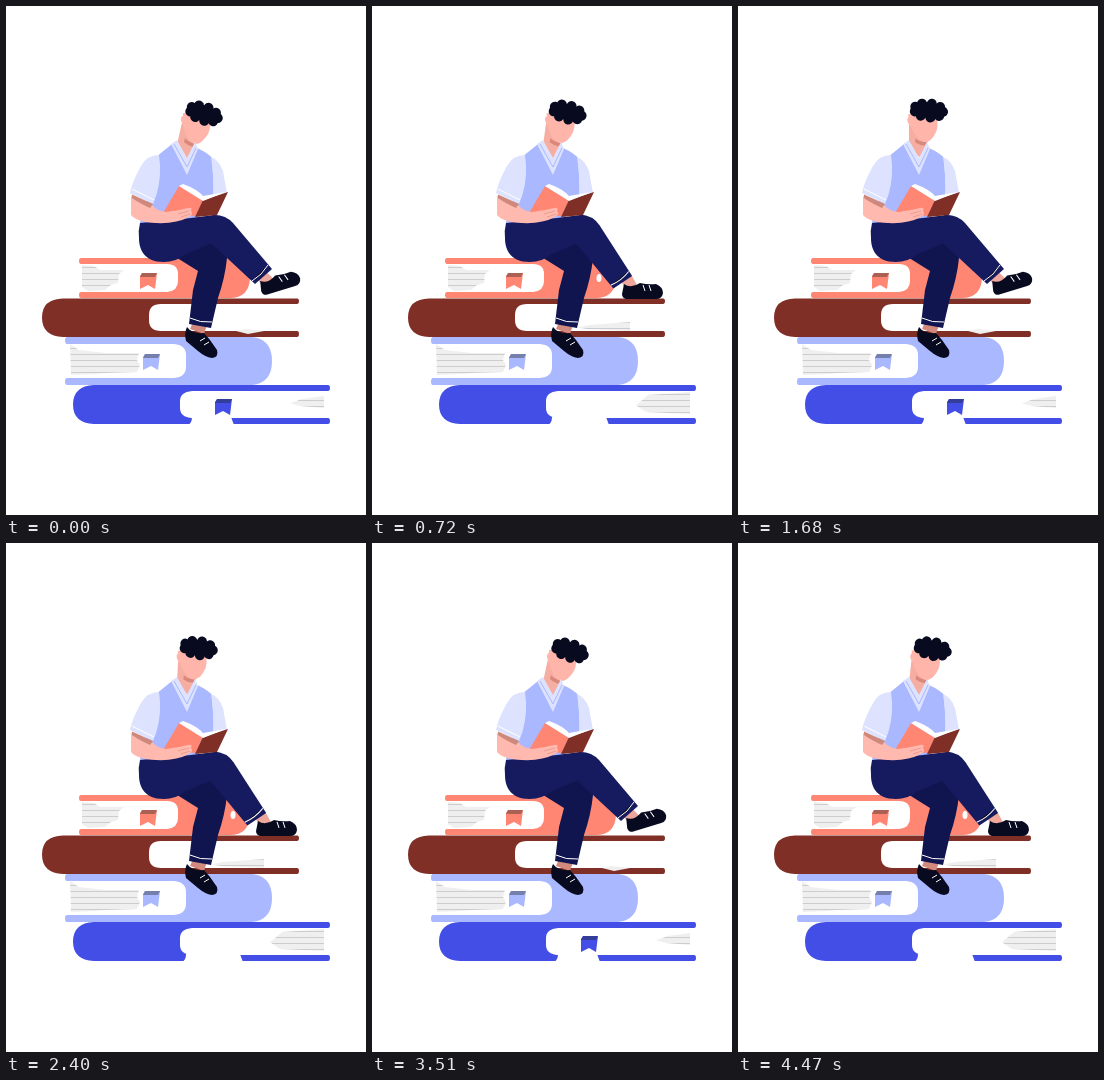
Recreate the animation shown at these times as an HTML page. Size 360x509 px, loop 4.5 s.

```html
<!DOCTYPE html>
<html lang="en">
<head>
<meta charset="utf-8">
<title>Reading on a stack of books</title>
<style>
  html, body { margin: 0; width: 100%; height: 100%; overflow: hidden; background: #fff; }
  svg { display: block; width: 100vw; height: 100vh; }
</style>
</head>
<body>
<svg viewBox="0 0 360 509">
  <defs>
    <pattern id="paper" width="10" height="6" y="3" patternUnits="userSpaceOnUse">
      <path fill="#efefef" d="M0 0h10v6H0z"/>
      <path fill="#cdcdcd" d="M0 0h10v1H0z"/>
    </pattern>
    <pattern id="paperMid" href="#paper" y="0"/>
    <pattern id="paperLow" href="#paper" y="4"/>
    <g id="ribbon">
      <path fill="currentColor" d="M0 3L2 0H17L15 16L8 12L0 16Z"/>
      <path fill="#222" opacity=".38" d="M0 4L2 0H17L15 4Z"/>
    </g>
  </defs>

  <!-- books -->
  <path fill="#ff8673" d="M75 252H224Q244 253 244 272Q243 292 224 292H75Q73 292 73 289T75 286H161Q172 285 172 275V268Q172 258 161 258H75Q73 258 73 255T75 252Z"/>
  <path fill="url(#paper)" d="M76 259L88 260L94 264L118 264L113 268L112 277L105 279L99 284L82 285L76 281Z"/>
  <use href="#ribbon" x="134" y="267" color="#ff8673"/>
  <ellipse id="hole" cx="227" cy="272" fill="#fff"/>
  <path fill="#802f27" d="M291 292.5H57Q36 293 36 311.500T57 331H291Q293 331 293 328T291 325H155Q143 325 143 314V309Q143 298 155 298H291Q293 298 293 295T291 292.500Z"/>
  <path id="brownPages" fill="url(#paperLow)"/>
  <path fill="#a9b8ff" d="M61 331H246Q266 333 266 355T246 379H61Q59 379 59 375.500T61 372H168Q180 371 180 361V349Q180 339 168 338H61Q59 338 59 334.500T61 331Z"/>
  <path fill="url(#paperMid)" d="M64 338L73 344L100 347H133L131 354L134 359L131 366L100 367L90 368L65 369Z"/>
  <use href="#ribbon" x="137" y="348" color="#a9b8ff"/>
  <path fill="#424ee6" d="M322 379H88Q67 380 67 398.500T88 418H322Q324 418 324 415T322 412H186Q174 411 174 402V395Q174 386 186 385H322Q324 385 324 382T322 379Z"/>
  <path id="bluePages" fill="url(#paperLow)"/>
  <path id="gap" fill="#fff"/>
  <use id="blueRibbon" href="#ribbon" x="209" y="393" color="#424ee6"/>

  <!-- head -->
  <g id="head">
    <path fill="#f6aea2" d="M176 116L171 139L181 154L189 138Z"/>
    <path fill="#d9897c" d="M179 132Q184 138 191 137L187 141Q182 140 178 136Z"/>
    <path fill="#ffb5aa" d="M177 107H203Q206 120 202 128Q196 138 189 138Q180 136 177 118Z"/>
    <circle cx="179" cy="113.500" r="4" fill="#ffb5aa"/>
    <g id="hair" fill="#080a20" transform="translate(198 107.500) rotate(18)">
      <ellipse rx="15" ry="8"/>
    </g>
  </g>

  <!-- body -->
  <path fill="#a9b8ff" d="M150 151Q160 143 166 138L181 166L191 142Q202 147 206 152L209 195L190 214L134 219L135 205L147 185Z"/>
  <path fill="#dde3ff" d="M165 138L171 134L181 152L189 136L192 143L181 169Z"/>
  <path fill="none" stroke="#a9b8ff" d="M168 138L181 161L190 142"/>
  <path fill="#dde3ff" d="M153 149Q141 149 135 160Q126 176 124 187L147 198Q155 180 154 159ZM205 151Q213 154 217 165L221 187L207 190Q208 170 205 151Z"/>
  <path fill="none" stroke="#fff" d="M126 183L148 194"/>

  <!-- standing leg -->
  <path fill="#d38a7e" d="M187 316L201 319L198 328L184 323Z"/>
  <path fill="#080a20" d="M181 321Q186 328 198 327L204 334L211 344Q213 351 206 352Q199 351 192 345L180 335Q178 327 181 321Z"/>
  <path stroke="#fff" d="M194 335L199 332M198 339L203 336"/>
  <path fill="#11154f" d="M168 250L206 234Q221 240 221 252Q219 272 212 292L205 322L183 318L187 284L192 265Z"/>
  <path fill="none" stroke="#fff" d="M184 312Q194 317 206 316"/>

  <!-- crossed leg -->
  <path fill="#161b60" d="M134 217L185 212L208 209Q218 210 226 218L220 240L206 237L178 249Q170 256 158 256C137 256 133 242 133 232Q132 225 134 217Z"/>
  <g id="foot">
    <path fill="#f0a79b" d="M250 276L260 270L266 281L254 286Z"/>
    <path fill="#080a20" d="M252 278Q259 283 268 277Q276 279 284 278Q291 281 291 287Q290 293 284 293H254Q250 292 250 288Z"/>
    <path stroke="#fff" d="M271 279L273 285M277 279L279 285"/>
  </g>
  <g id="shin">
    <path fill="#161b60" d="M206 209Q219 208 227 217L266 263L249 278L206 238Z"/>
    <path stroke="#fff" d="M246 275Q256 269 262 259"/>
  </g>

  <!-- book in hand and forearm -->
  <path fill="#ff8673" d="M173 180L197 194L190 210L157 207Z"/>
  <path fill="#802f27" d="M197 194L222 186L211 209L189 211Z"/>
  <path fill="#fff" d="M173 180L177 178Q191 183 197 190L220 186L197 195Z"/>
  <path fill="#ffb9ae" d="M125 190L146 199Q151 205 160 206L173 204L182 202Q187 201 185 205Q188 208 183 211Q170 218 150 217Q131 216 125 209Z"/>
  <path fill="#cf897c" d="M126 188.500L147 198L144 202Q133 197 126 192Z"/>
  <path fill="none" stroke="#ec9d91" d="M172 208L183 205M175 211L184 208"/>
</svg>

<script>
const LOOP = 4500;
const HEAD_PERIOD = 3600;
const FOOT_PERIOD = 1800;
const CURLS = 9;
const $ = id => document.getElementById(id);
const set = (id, name, value) => $(id).setAttribute(name, value);
const wave = (t, period) => Math.cos(2 * Math.PI * t / period);
const mix = (a, b, k) => a + (b - a) * k;

for (let i = 0; i < CURLS; i++) {
  const angle = 2 * Math.PI * i / CURLS;
  const x = 14.5 * Math.cos(angle), y = 7 * Math.sin(angle);
  $('hair').innerHTML += `<circle cx="${x}" cy="${y}" r="5"/>`;
}

// A ragged wedge of paper, pointed on the left
const wedge = (left, right, top, bottom) =>
  `M${left} ${mix(top, bottom, 0.6)}L${left + 12} ${top + 3}L${right} ${top}V${bottom}L${left + 10} ${bottom - 2}Z`;

// The white parts of the books wear away in step with the tapping foot
function drawPaper(down) {
  const from = mix(186, 180, down), to = mix(225, 234, down);
  set('bluePages', 'd', wedge(mix(284, 264, down), 318, mix(390, 386, down), mix(402, 408, down)));
  set('brownPages', 'd', wedge(mix(230, 205, down), 258, mix(325, 316, down), 325));
  set('gap', 'd', `M${from - 4} 419Q${from} 417 ${from} 411H${to}L${to + 3} 419Z`);
  set('blueRibbon', 'visibility', down < 0.5 ? 'visible' : 'hidden');
  set('hole', 'rx', 2.5 * down);
  set('hole', 'ry', 4 * down);
}

function draw(now) {
  const t = now % LOOP;
  const raised = Math.min(1, Math.max(0, 0.5 + 0.9 * wave(t, FOOT_PERIOD)));
  const up = raised * raised * (3 - 2 * raised);
  set('head', 'transform', `rotate(${-6.25 * (1 - wave(t, HEAD_PERIOD))} 180 140)`);
  set('shin', 'transform', `rotate(${7.5 * (1 - up)} 210 222)`);
  set('foot', 'transform', `translate(${6 * up} ${-3.5 * up}) rotate(${-17 * up} 252 291)`);
  drawPaper(1 - up);
  requestAnimationFrame(draw);
}
requestAnimationFrame(draw);
</script>
</body>
</html>
```
